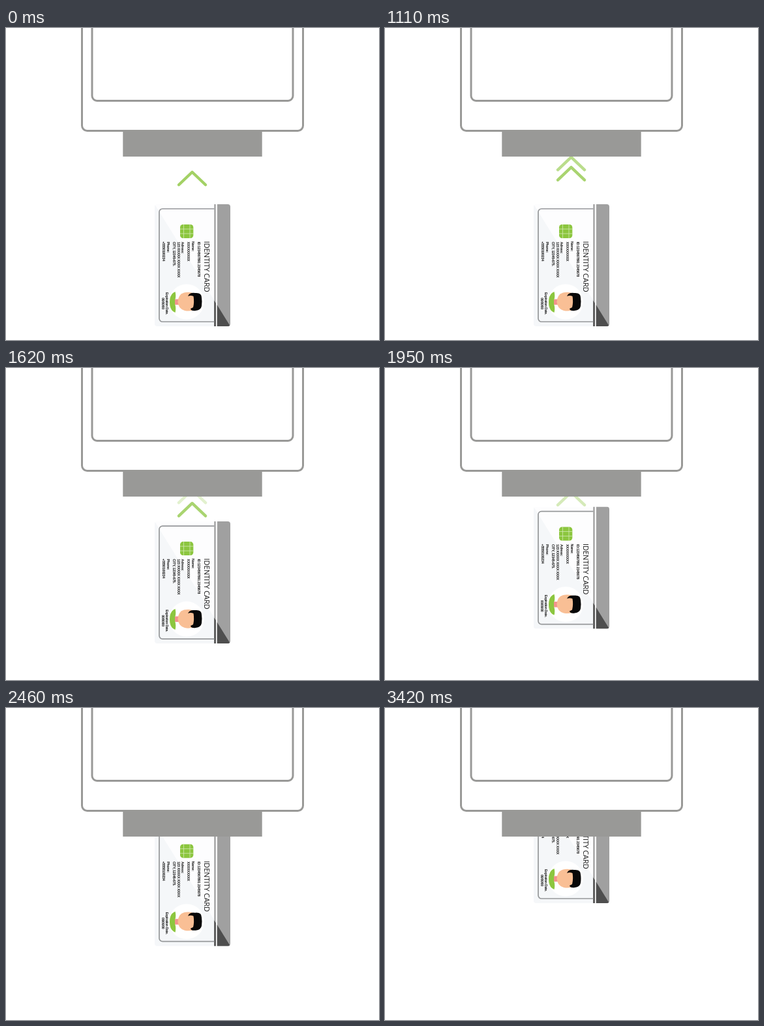
These frames come from a looping animation (572x478 px, 3.95 s). An HTML page:

```html
<!DOCTYPE html>
<html lang="en">
<head>
<meta charset="utf-8">
<title>Insert card</title>
<style>
  html, body { margin: 0; width: 100%; height: 100%; overflow: hidden; background: #fff; }
  svg { display: block; width: 572px; height: 478px; }
  text { fill: #1a1a1a; font-family: "Liberation Sans", Arial, sans-serif; }
  .title { font: 11.3px "Open Sans", sans-serif; letter-spacing: -.2px; }
  .small { font-size: 5.4px; font-weight: bold; letter-spacing: -.3px; }
  .date { font-size: 5.1px; font-weight: bold; letter-spacing: -.3px; text-anchor: middle; }
</style>
</head>
<body>
<svg viewBox="0 0 572 478">
  <defs>
    <clipPath id="below"><rect x="0" y="197" width="572" height="281"/></clipPath>
    <clipPath id="outline"><rect x="228" y="270" width="116" height="187" rx="4"/></clipPath>
  </defs>

  <g fill="none" stroke="#999997" stroke-width="3">
    <path d="M116.5 -5V149.5a8 8 0 0 0 8 8H447.500a8 8 0 0 0 8 -8V-5"/>
    <path d="M132 -5V104a7.500 7.500 0 0 0 7.500 7.500H432.500a7.500 7.500 0 0 0 7.500 -7.500V-5"/>
  </g>
  <rect x="179.300" y="157" width="213.400" height="40" fill="#999997"/>

  <g clip-path="url(#below)">
    <g id="arrows" fill="none" stroke="#8cc63f" stroke-width="4.400" stroke-linecap="round" stroke-linejoin="round"></g>
    <g id="card">
      <g clip-path="url(#outline)">
        <rect x="228" y="270" width="116" height="187" fill="#fdfdfe"/>
        <path d="M228 270L344 457H228z" fill="#f5f7f9"/>
        <path d="M319.300 270h2.500v187h-2.500zM323.700 270H344v187h-20.300z" fill="#a0a0a0"/>
        <path d="M321.800 270h1.900v187h-1.900z" fill="#fff"/>
        <path d="M319.300 417.500l2.500 4V457h-2.500zM323.700 424.300L344 457h-20.300z" fill="#4e4e4e"/>
      </g>
      <path d="M319.500 277H240a5 5 0 0 0 -5 5V445a5 5 0 0 0 5 5H319.500" fill="none" stroke="#96989a" stroke-width="1.700"/>
      <rect x="267" y="301" width="20.300" height="21" rx="4.500" fill="#8cc63f"/>
      <path d="M267 308h20.300M267 315h20.300M272.500 301v21M282 301v21" fill="none" stroke="#d3eab3" stroke-width=".8"/>
      <circle cx="277" cy="419.500" r="27" fill="#fff"/>
      <path d="M259.500 404Q251 407 251 420T259.500 436Q261 430 259.500 424V416Q261 410 259.500 404z" fill="#8cc63f"/>
      <rect x="259" y="415.500" width="8" height="8.500" rx="1" fill="#f2938c"/>
      <path d="M263.500 419.500Q264 408 273 405.500Q284 403 291 409V430Q284 435 274 433Q264 430 263.500 419.500z" fill="#f9bf95"/>
      <path d="M279 411Q281 405 290 406Q300 405 300 413Q301 419 300 426Q299 432 291 433Q284 434 283 430L287 428Q289 420 287.500 411Q283 409 279 411z" fill="#080808"/>
      <g id="labels"></g>
    </g>
  </g>
</svg>
<script>
const LOOP = 3950, STEP = 30;
const CARD_START = 1110, CARD_END = 3420, CARD_TRAVEL = 158;
const NS = "http://www.w3.org/2000/svg";
const byId = id => document.getElementById(id);
const clamp = x => Math.min(1, Math.max(0, x));

function add(parent, tag, attrs, content = "") {
  const el = document.createElementNS(NS, tag);
  for (const key in attrs) el.setAttribute(key, attrs[key]);
  el.textContent = content;
  return parent.appendChild(el);
}

// Labels run down the card: class, baseline x, top or middle y, text.
const labels = [
  ["title", 303.8, 326.500, "IDENTITY CARD"],
  ["small", 293.800, 327.500, "ID:1234567891 2345678"],
  ["small", 285, 327, "Name:"],
  ["small", 278, 327.500, "XXXXXXXXX"],
  ["small", 268.800, 327.500, "Adress:"],
  ["small", 262.800, 327.500, "123 XXXXX XXXX XXXX"],
  ["small", 255.800, 327.500, "CITY, 12345-675."],
  ["small", 246.800, 327.500, "Phone:"],
  ["small", 240.300, 327, "+5550100234"],
  ["date", 245, 422, "Expiration Date."],
  ["date", 239, 422, "00/00/00"]
];
for (const [cls, x, y, words] of labels)
  add(byId("labels"), "text", { class: cls, transform: `translate(${x} ${y}) rotate(90)` }, words);

// Each arrow rises from BASE at its own start time and speed (px/ms).
const BASE = 252;
const arrows = [
  { start: -250, speed: .047, alpha: .8, fade: .12 },
  { start: 456, speed: .053, alpha: .74, fade: .5 },
  { start: 743, speed: .052, alpha: .74, fade: .5 },
  { start: 1124, speed: .051, alpha: .74, fade: .5 }
];
for (const a of arrows)
  a.el = add(byId("arrows"), "path", { d: "M265 0L285.500 -19.500L306 0" });

function draw(time) {
  const t = Math.floor(time / STEP) * STEP;
  const p = clamp((t - CARD_START) / (CARD_END - CARD_START));
  byId("card").setAttribute("transform", `translate(0 ${-CARD_TRAVEL * p})`);
  for (const a of arrows) {
    const rise = (t - a.start) * a.speed;
    const shown = clamp(rise / 4);
    const fade = a.fade * clamp((rise - 30) / 16);
    a.el.setAttribute("transform", `translate(0 ${BASE - rise})`);
    a.el.setAttribute("opacity", shown * (a.alpha - fade));
  }
}

const began = performance.now();
function tick() {
  draw((performance.now() - began) % LOOP);
  requestAnimationFrame(tick);
}
tick();
</script>
</body>
</html>
```
